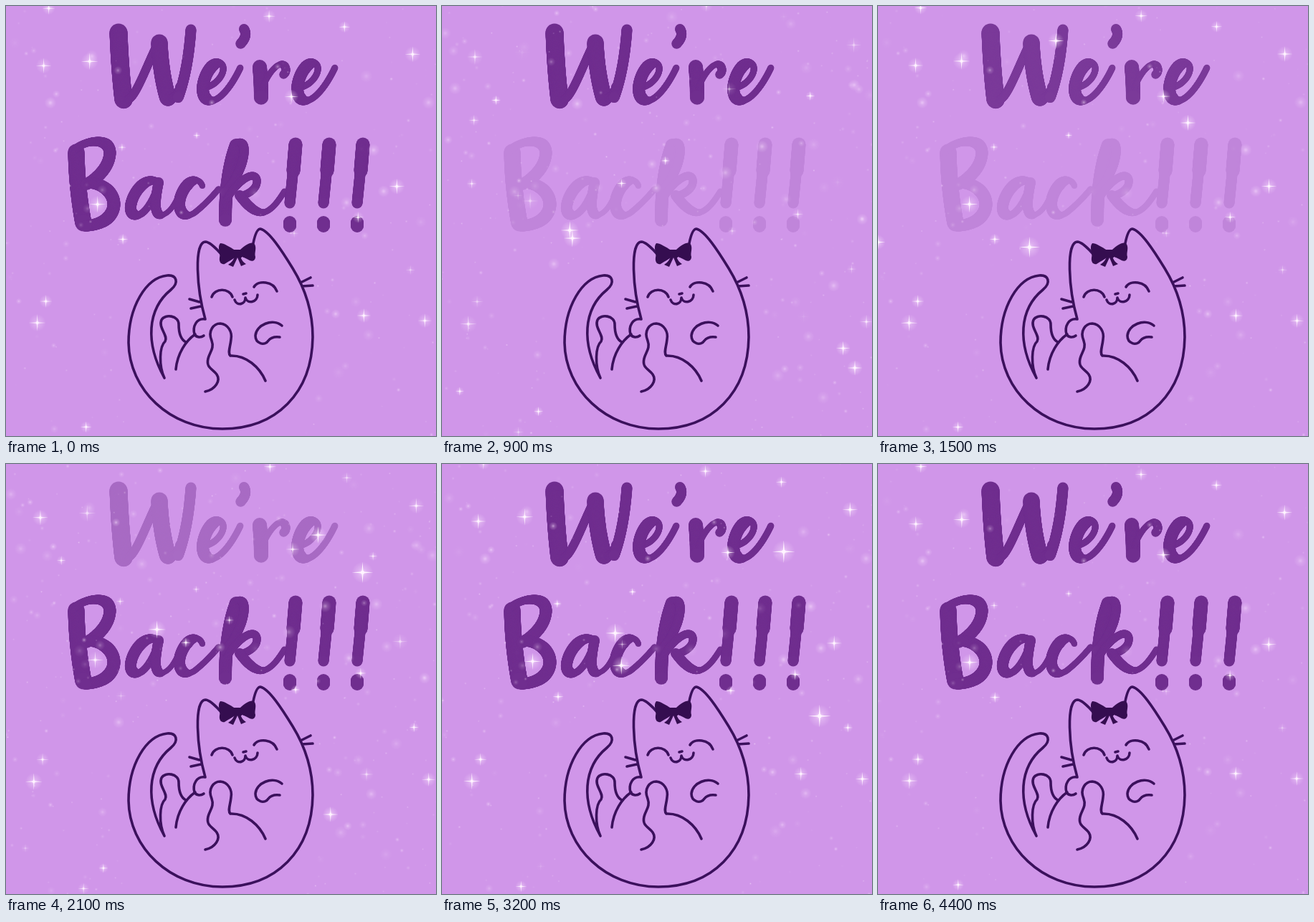
An HTML page with a canvas for the animation above (4500 ms loop, 600 by 600 pixels).

```html
<!DOCTYPE html>
<html lang="en">
<head>
<meta charset="utf-8">
<title>We're Back!!!</title>
<style>
html, body { margin: 0; width: 100%; height: 100%; overflow: hidden; background: #d096e9; }
canvas { display: block; width: 600px; height: 600px; }
</style>
</head>
<body>
<canvas id="stage" width="600" height="600" role="img" aria-label="We're Back!!!"></canvas>
<script>
const LOOP = 4500, STEP = 100, SKY = 1475, SKY_START = 50;
const ctx = document.getElementById('stage').getContext('2d');
const clamp = v => Math.max(0, Math.min(1, v));

let seed = 27;
const rnd = () => (seed = (seed * 16807) % 2147483647) / 2147483647;
const many = (length, make) => Array.from({ length }, (_, i) => make(i));

// Brush strokes: width going down, width going up, path.
const letterE = x => [17, 9, `M${x} 113c19-6 29-29 17-34c-16 0-30 36-20 49c12 14 34-10 49-42`];
const bang = i => {
  const x = 404 + 47 * i;
  return [[19, 19, `M${x} 193L${x - 3} 230`], [15, 15, `M${x - 2} 215L${x - 8} 275`],
    [18, 18, `M${x - 8} 302v5`]];
};
const WE = [
  [25, 12, 'M157 37Q159 90 164 131C178 138 192 92 212 52'],
  [23, 13, 'M214 51Q216 95 226 129Q240 130 243 112'],
  [15, 15, 'M258 33Q254 90 240 128'],
  letterE(281),
  [14, 12, 'M332 32Q338 42 327 53'],
  [20, 20, 'M354 85Q356 108 356 128'],
  [12, 8, 'M358 114C366 92 384 72 390 86Q392 92 387 96'],
  letterE(413)
];
const BACK = [
  [23, 23, 'M98 204Q99 255 108 303'],
  [17, 11, 'M93 203C106 187 146 181 145 206C143 226 128 240 112 249'],
  [18, 14, 'M116 247C138 247 156 266 149 285C143 301 125 306 110 307'],
  [16, 10, 'M213 246C190 232 165 280 177 290C190 300 207 270 213 248'],
  [14, 7, 'M213 246C208 270 206 290 216 292Q228 290 237 272'],
  [16, 8, 'M274 251C268 235 250 245 243 268C238 290 252 298 265 287Q280 275 297 255'],
  [18, 18, 'M321 194Q306 235 306 299'],
  [13, 8, 'M322 191C338 186 332 215 326 228Q318 248 305 260'],
  [11, 11, 'M309 268C322 245 346 228 350 242Q352 258 326 266'],
  [14, 8, 'M326 264Q345 290 360 288C372 284 380 272 389 258'],
  ...[0, 1, 2].flatMap(bang)
];

// A brush presses harder the more steeply it moves down.
function lettering(strokes) {
  const sheet = document.createElement('canvas');
  sheet.width = sheet.height = 600;
  const g = sheet.getContext('2d');
  g.fillStyle = '#702e8f';
  const path = document.createElementNS('http://www.w3.org/2000/svg', 'path');
  for (const [heavy, light, d] of strokes) {
    path.setAttribute('d', d);
    const length = path.getTotalLength();
    for (let s = 0; s <= length; s += .7) {
      const p = path.getPointAtLength(s);
      const a = path.getPointAtLength(Math.max(0, s - 7));
      const b = path.getPointAtLength(Math.min(length, s + 7));
      const fall = (b.y - a.y) / (Math.hypot(b.x - a.x, b.y - a.y) || 1);
      g.beginPath();
      g.arc(p.x, p.y, (light + (heavy - light) * clamp(.3 + fall)) / 2, 0, 7);
      g.fill();
    }
  }
  return sheet;
}
const we = lettering(WE), back = lettering(BACK);

// Opacity sinks to `low` at `mid` and is full again `half` away from it.
const pulse = (t, mid, half, low) => low + (1 - low) * clamp(Math.abs(t - mid) / half) ** 2;
const weAlpha = t => Math.min(pulse(t, 450, 450, .35), pulse(t, 1950, 500, .35));
const backAlpha = t => pulse(t, 1200, 900, .05);

const catLines = new Path2D([
  'M221 519C194 470 197 423 230 396C242 386 238 375 225 376C195 379 171 420 171 470C172 535 228 590 302 590C377 590 427 540 428 462C428 425 416 392 400 366C384 340 367 314 355 311C350 311 347 321 345 331',
  'M301 347C295 340 284 329 278 329C262 330 266 395 278 437',
  'M278 437C266 435 260 447 263 458C266 463 272 463 276 460',
  'M264 458C251 467 239 485 237 507',
  'M221 519C213 502 214 475 222 468C227 460 212 449 217 438C222 429 241 432 241 444C241 456 243 465 251 469',
  'M278 538C292 535 300 523 294 514C288 506 279 505 282 492C284 483 291 478 287 467C281 453 290 443 299 443C310 444 316 455 314 465C313 476 309 484 313 488C335 487 354 504 362 523',
  'M385 446C372 435 349 445 348 460C348 471 361 475 366 467C370 462 375 461 382 462',
  'M287 406C291 393 312 393 316 406M346 392C352 382 373 384 378 398',
  'M319 410C322 419 334 417 334 407C337 417 351 413 351 403M331 402L335 401',
  'M411 386L425 379M413 391L428 390M256 409L270 413M258 422L272 419'
].join(''));
const bow = [
  'M320 341C312 336 304 331 299 331C294 337 300 345 298 351C297 358 301 361 305 360C311 356 316 354 320 350Z',
  'M326 341C333 334 341 329 346 331C351 337 346 344 348 350C348 355 344 357 340 355C335 352 330 350 326 349Z',
  'M317 340H329V351H317Z',
  'M319 348C318 355 314 358 310 361L317 364L323 351L328 363L335 360C330 357 328 353 327 348Z'
].map(d => new Path2D(d));

// A few leading stars, then scattered ones outside the cat.
const outside = () => {
  const x = rnd() * 600, y = rnd() * 600;
  return Math.hypot(x - 300, y - 465) < 150 ? outside() : [x, y];
};
const leaders = [[472, 30], [567, 68], [367, 15], [117, 78], [398, 127], [491, 295], [545, 252],
  [56, 412], [44, 442], [499, 432], [112, 587], [53, 84], [60, 4], [128, 277], [584, 439]];
const stars = [
  ...leaders.map(([x, y], i) => ({ x, y, size: 8 + i * 3 % 5, peak: i % 3 * 200, span: 1000 })),
  ...many(16, () => ([x, y]) => ({ x, y, size: 5 + 3 * rnd(), peak: rnd() * SKY, span: 600 }))
    .map(make => make(outside()))
];
const flashes = many(24, i => {
  const [x, y] = outside();
  return { x, y, size: 10 + 6 * rnd(), peak: 900 + 600 * (i % 6) };
});
const dust = many(300, () => {
  const [x, y] = outside();
  return { x, y, r: .8 + 4 * rnd() ** 4, peak: rnd() * SKY, a: .2 + .4 * rnd() };
});

const shine = (t, peak, span) => clamp(1.35 * (1 - Math.abs(t - peak) / span));

// The sky zooms slowly away from a point near the cat.
function drift({ x, y }, t) {
  const k = .043 * t / 1000;
  return [x + (x - 300) * k * .7, y + (y - 400) * k];
}

function glow(x, y, r, a) {
  const g = ctx.createRadialGradient(x, y, 0, x, y, r);
  g.addColorStop(0, `rgba(250,228,254,${a})`);
  g.addColorStop(.4, `rgba(250,228,254,${a * .4})`);
  g.addColorStop(1, 'rgba(250,228,254,0)');
  ctx.fillStyle = g;
  ctx.fillRect(x - r, y - r, 2 * r, 2 * r);
}

function star(x, y, size, a) {
  if (a <= 0) return;
  glow(x, y, size, a * .8);
  ctx.fillStyle = `rgba(255,244,255,${a})`;
  ctx.beginPath();
  for (let i = 0; i < 8; i++) {
    const r = i % 2 ? Math.max(.9, size * .1) : size, q = i * Math.PI / 4;
    ctx.lineTo(x + r * Math.cos(q), y + r * Math.sin(q));
  }
  ctx.fill();
  ctx.beginPath();
  ctx.arc(x, y, size * .17, 0, 7);
  ctx.fill();
}

function drawCat() {
  ctx.strokeStyle = '#3b105c';
  ctx.lineWidth = 3.6;
  ctx.lineCap = ctx.lineJoin = 'round';
  ctx.stroke(catLines);
  ctx.fillStyle = '#350d50';
  bow.forEach(part => ctx.fill(part));
}

function draw(t) {
  const sky = (t + SKY_START) % SKY;
  ctx.fillStyle = '#d096e9';
  ctx.fillRect(0, 0, 600, 600);

  ctx.globalAlpha = weAlpha(t);
  ctx.drawImage(we, 0, 0);
  ctx.globalAlpha = backAlpha(t);
  ctx.drawImage(back, 0, 0);
  ctx.globalAlpha = 1;

  for (const d of dust) glow(...drift(d, sky), d.r * 2, d.a * shine(sky, d.peak, 900));
  drawCat();
  for (const s of stars) star(...drift(s, sky), s.size, .9 * shine(sky, s.peak, s.span));
  for (const f of flashes) star(f.x, f.y, f.size, shine(t, f.peak, 380));
}

const start = performance.now();
function frame() {
  const t = Math.max(0, performance.now() - start) % LOOP;
  draw(Math.floor(t / STEP) * STEP);
  requestAnimationFrame(frame);
}
frame();
</script>
</body>
</html>
```
